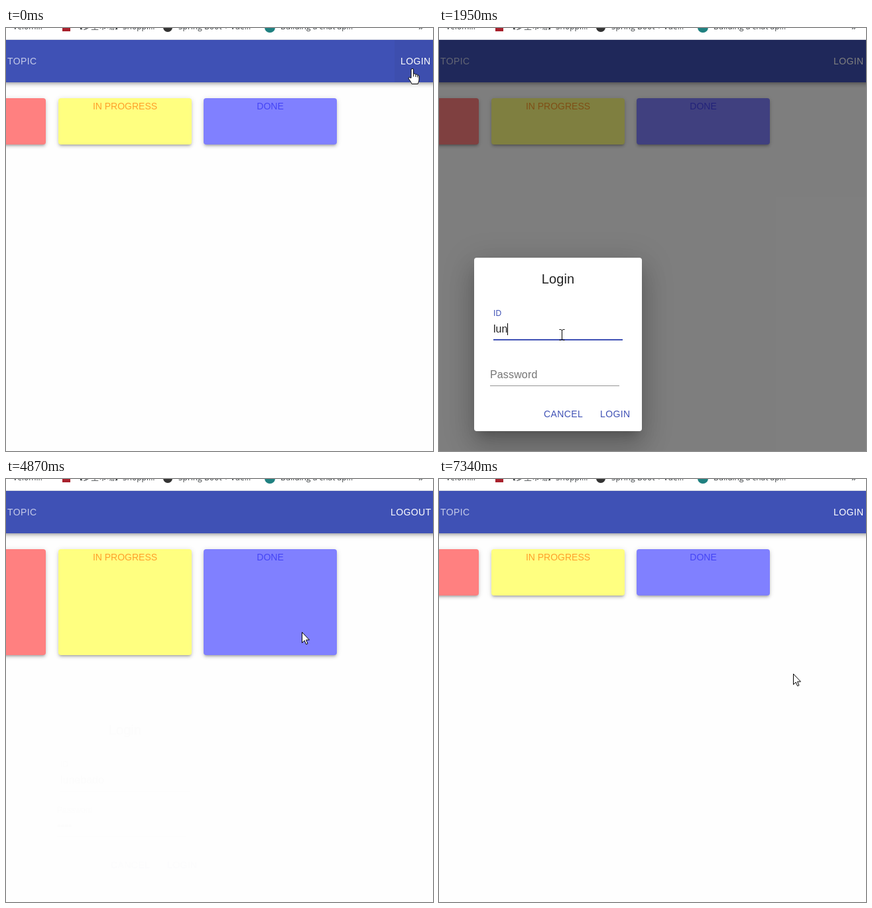
An HTML page that plays this animation: 644x639 px, repeating every 8.04 s.

```html
<!DOCTYPE html>
<html lang="ko">
<head>
<meta charset="utf-8">
<title>Task board</title>
<style>
html, body { margin: 0; width: 100%; height: 100%; overflow: hidden; background: #fefefe; }
body { position: relative; font: 14px/20px "Liberation Sans", Arial, "Noto Sans CJK KR", "Noto Sans CJK", sans-serif; color: rgba(0,0,0,.87); }
div, svg { position: absolute; white-space: pre; }
#bar { left: 0; top: 0; width: 100%; height: 17px; background: #fff; border-bottom: 1px solid #dcdee2; overflow: hidden;
  font: 12px/20px "Open Sans", "Noto Sans CJK JP", "Noto Sans CJK", sans-serif; color: #3c4043; }
#bar div { top: -12px; }
#page { left: 0; top: 18px; right: 0; bottom: 0; overflow: hidden; }
#world { left: 0; top: -18px; width: 100%; height: 639px; }
#board { left: 0; top: 0; }
#head { left: -20px; right: -20px; top: 18px; height: 64px; background: #3f51b5;
  box-shadow: 0 2px 4px -1px rgba(0,0,0,.2), 0 4px 5px rgba(0,0,0,.14), 0 1px 10px rgba(0,0,0,.12); }
.btn { letter-spacing: .4px; }
#hover, #flash { top: 18px; right: 0; height: 64px; }
#hover { background: rgba(0,0,0,.04); }
#flash { left: 586px; background: #fff; border-radius: 4px 0 0 4px; }
#ripple { left: 598px; top: 28px; width: 44px; height: 44px; border-radius: 50%; background: #fff; }
.col { top: 106px; width: 201px; border-radius: 4px; overflow: hidden;
  box-shadow: 0 3px 3px -2px rgba(0,0,0,.2), 0 3px 4px rgba(0,0,0,.14), 0 1px 8px rgba(0,0,0,.12); }
.name { left: 0; top: 2px; width: 100%; text-align: center; }
.card { left: 3px; width: 194px; background: #fff; border-radius: 4px; letter-spacing: .15px;
  box-shadow: 0 2px 1px -1px rgba(0,0,0,.2), 0 1px 1px rgba(0,0,0,.14), 0 1px 3px rgba(0,0,0,.12); }
.mid { left: 0; width: 166px; text-align: center; }
.date { font-size: 10px; letter-spacing: 0; color: #444; }
.dot { width: 7px; height: 7px; border-radius: 50%; left: 176px; }
#shade { left: 0; top: 18px; right: 0; bottom: 0; background: rgba(0,0,0,.5); }
#modal { left: 53px; top: 347px; width: 253px; height: 262px; background: #fff; border-radius: 4px;
  box-shadow: 0 11px 15px -7px rgba(0,0,0,.2), 0 24px 38px 3px rgba(0,0,0,.14), 0 9px 46px 8px rgba(0,0,0,.12); }
#modal .btn { top: 226px; color: #3f51b5; }
.field { width: 195px; height: 60px; font-size: 16px; }
.label { left: 0; top: 0; letter-spacing: .15px; transform-origin: 0 0; }
.value { left: 0; top: 0; height: 20px; display: flex; align-items: center; }
.value b { width: 1px; height: 18px; margin-right: -1px; background: #000; }
.line { left: 0; width: 100%; top: 26px; height: 1px; }
.focus { left: 0; width: 100%; top: 25px; height: 2px; background: #3f51b5; }
#alert { left: -60px; top: -40px; width: 464px; height: 144px; background: #fff; border-radius: 2px;
  box-shadow: 0 1px 3px rgba(0,0,0,.45), 0 2px 8px rgba(0,0,0,.25); }
#ok { left: 383px; top: 95px; width: 65px; height: 33px; border-radius: 4px; background: #3584ea; color: #fff;
  font-size: 13px; line-height: 32px; text-align: center; }
#mouse { left: 0; top: 0; width: 1px; height: 1px; overflow: visible; }
#mouse path { stroke-linejoin: round; }
</style>
</head>
<body>
<div id="page"><div id="world">
  <div id="head"></div>
  <div id="hover"></div><div id="flash"></div><div id="ripple"></div>
  <div class="btn" style="left:2px;top:40px;color:rgba(255,255,255,.7)">TOPIC</div>
  <div class="btn" id="sign" style="top:40px;color:#fff"></div>
  <div id="board"></div>
  <div id="shade"></div>
  <div id="modal">
    <div style="left:0;width:100%;top:22px;text-align:center;font-size:20px;letter-spacing:.15px">Login</div>
    <div class="btn" style="left:105px">CANCEL</div>
    <div class="btn" style="left:190px">LOGIN</div>
  </div>
</div></div>
<div id="bar"></div>
<div id="alert">
  <div style="right:296px;top:31px;font-size:15px">localhost:3000 내용:</div>
  <div style="right:367px;top:60px;font-size:13px;color:#444">Logged out</div>
  <div id="ok">확인</div>
</div>
<svg id="mouse">
  <path id="arrow" d="M.5 .5V16.5L4.2 13 6.7 18.7 9 17.7 6.6 12.1H11.5Z" fill="#fff" stroke="#000"/>
  <g id="hand" fill="#fff" stroke="#000">
    <path d="M-2 13.5V1.2a1.8 1.8 0 0 1 3.6 0V7.6c1-.9 3-.6 3.3.8 1-.7 2.6-.2 2.9 1 1.2-.4 2.2.3 2.2 1.6V16c0 3-1.5 4-1.8 6.5H-1c-.6-2.5-3-5-4.6-7.8-.9-1.6 1-2.7 2.2-1.6z"/>
    <path d="M1.6 7.6V11.5M4.9 8.4V12M7.8 9.4V12.5" fill="none"/>
  </g>
  <path id="beam" d="M-3.5-7.5H-1.5L.5-6.5 2.5-7.5H4.5M.5-6.5V7.5M-3.5 8.5H-1.5L.5 7.5 2.5 8.5H4.5" fill="none" stroke="#000"/>
</svg>
<script>
const LOOP = 8040;
const $ = id => document.getElementById(id);

function add(parent, cls, css, text = '') {
  const el = document.createElement('div');
  el.className = cls;
  el.style.cssText = css;
  el.textContent = text;
  parent.append(el);
  return el;
}

const clamp = v => Math.min(1, Math.max(0, v));
const ramp = (t, a, b) => { const p = clamp((t - a) / (b - a)); return p * p * (3 - 2 * p); };
const pulse = (t, a, b, c, d) => ramp(t, a, b) - ramp(t, c, d);
const mix = (a, b, p) => a + (b - a) * p;

// Bookmarks
[[-4, 't - Velom...'], [104, '【夢星市場】Shoppi...'], [260, 'Spring Boot + Vue...'], [414, 'Building a chat ap...']]
  .forEach(([x, s]) => add($('bar'), '', `left:${x}px`, s));
add($('bar'), '', 'left:622px;top:-13px;font-size:15px', '»');
[[85, -7, 12, '#a8202c', 0], [237, -8, 14, '#333', 50], [390, -9, 16, '#1f8080', 50]].forEach(([x, y, d, c, r]) =>
  add($('bar'), '', `left:${x}px;top:${y}px;width:${d}px;height:${d}px;background:${c};border-radius:${r}%`));

// Board
const cols = [[-141, '#ff8080', '#e33', 'TODO'], [79, '#ffff80', '#ff9f2a', 'IN PROGRESS'], [298, '#8080ff', '#4545f5', 'DONE']]
  .map(([x, bg, ink, name]) => {
    const col = add($('board'), 'col', `left:${x}px;background:${bg}`);
    add(col, 'name', `color:${ink}`, name);
    return col;
  });
const cards = [];

function card(col, top, height, dotY, color) {
  const el = add(cols[col], 'card', `top:${top - 106}px;height:${height}px`);
  if (!col) el.style.left = '4px';
  add(el, 'dot', `top:${dotY - top - 3.5}px;background:${color}`);
  cards.push(el);
  return el;
}

// top, height, then [line centre, right edge on stage, text]
[[141, 50, [155, 18, 'React - todo'], [177, 22, 'center']],
 [198, 72, [234, 25, 'Vue - article 처']],
 [276, 50, [290, 8, 'Node - cache']],
 [332, 28, [346, 10, 'Java - start']],
 [367, 28, [381, 15, 'Docker - start']],
 [401, 50]].forEach(([top, h, ...lines]) => {
  const el = card(0, top, h, top + h / 2, '#f52a1c');
  lines.forEach(([y, right, s]) => add(el, '', `right:${57 - right}px;top:${y - top - 10}px`, s));
});
[[141, 'Native - 대기질api 체크', '2020-5-6 ~'], [196, 'D3 - study d3', '2020-5-5 ~']].forEach(([top, name, date]) => {
  const el = card(1, top, 48, top + 14.5, '#ffe135');
  add(el, 'mid', 'top:4px', name);
  add(el, 'mid date', 'top:26px', date);
});

// Form fields
function field(x, y, name) {
  const el = add($('modal'), 'field', `left:${x - 53}px;top:${y - 347}px`);
  const f = { line: add(el, 'line', ''), focus: add(el, 'focus', ''), label: add(el, 'label', '', name), value: add(el, 'value', '') };
  f.text = document.createElement('span');
  f.caret = document.createElement('b');
  f.value.append(f.text, f.caret);
  return f;
}
const idField = field(82, 445, 'ID');
const pwField = field(77, 514, 'Password');

const USER = 'lunebado';
const idKeys = [1700, 1850, 1950, 2020, 2100, 2170, 2320, 2400];
const pwKeys = [3100, 3250, 3250, 3330];

function showField(f, t, start, end, keys, text) {
  const up = ramp(t, start, start + 230);
  const lit = up - ramp(t, end, end + 200);
  const n = keys.filter(k => k <= t).length;
  const since = t - (n ? keys[n - 1] : start);
  f.label.style.transform = `translateY(${-21.5 * up}px) scale(${1 - .25 * up})`;
  f.label.style.color = `rgb(${mix(117, 63, lit)},${mix(117, 81, lit)},${mix(117, 181, lit)})`;
  f.focus.style.transform = `scaleX(${up})`;
  f.focus.style.opacity = 1 - ramp(t, end, end + 200);
  f.text.textContent = text.slice(0, n);
  f.caret.style.opacity = t >= start && t < end && since % 1060 < 530 ? 1 : 0;
}

// Pointer: time, hotspot x, y, shape
const path = [
  [0, 613, 62, 'hand'], [110, 613, 62, 'hand'], [200, 575, 90, 'arrow'], [460, 347, 228, 'arrow'],
  [760, 196, 440, 'arrow'], [840, 188, 459, 'beam'], [1070, 185, 463, 'beam'], [3909, 185, 463, 'beam'],
  [3910, 294, 629, 'arrow'], [4000, 288, 645, 'arrow'], [4250, 300, 645, 'arrow'], [4870, 446, 231, 'arrow'],
  [5260, 598, 84, 'arrow'], [5380, 611, 58, 'hand'], [6180, 611, 58, 'hand'], [6230, 590, 60, 'arrow'],
  [6480, 356, 70, 'arrow'], [6650, 356, 70, 'arrow'], [6730, 374, 110, 'arrow'], [7340, 534, 294, 'arrow'], [LOOP, 534, 294, 'arrow']
];

function showMouse(t) {
  const i = path.findIndex(k => k[0] > t);
  const a = path[i - 1], b = path[i];
  const p = (t - a[0]) / (b[0] - a[0]);
  $('mouse').style.transform = `translate(${Math.round(mix(a[1], b[1], p))}px,${Math.round(mix(a[2], b[2], p))}px)`;
  ['arrow', 'hand', 'beam'].forEach(k => $(k).style.display = k === a[3] ? '' : 'none');
}

function render(t) {
  const out = t >= 4680 && t < 6930;
  $('sign').textContent = out ? 'LOGOUT' : 'LOGIN';
  $('sign').style.left = out ? '580px' : '595px';
  $('hover').style.left = out ? '572px' : '586px';
  $('hover').style.opacity = t < 200 || (t > 5300 && t < 6280) ? 1 : 0;
  $('flash').style.opacity = .18 * pulse(t, 70, 250, 480, 800);
  $('ripple').style.opacity = .2 * pulse(t, 5920, 5990, 6790, 7050);
  $('ripple').style.transform = `scale(${mix(.4, 1, ramp(t, 5900, 6000)) + .5 * ramp(t, 6790, 7050)})`;

  const height = 70 + 374 * pulse(t, 4680, 5280, 6890, 7330);
  cols.forEach(c => c.style.height = height + 'px');
  const shown = pulse(t, 4960, 5400, 6850, 7060);
  cards.forEach(c => {
    c.style.opacity = shown;
    c.style.transform = `scale(${mix(.85, 1, shown)})`;
  });

  const modal = pulse(t, 120, 350, 4640, 4878);
  $('shade').style.opacity = $('modal').style.opacity = modal;
  showField(idField, t, 240, 2600, idKeys, USER);
  showField(pwField, t, 2600, 4640, pwKeys, '••••');
  idField.line.style.background = `rgba(0,0,0,${t > 840 && t < 4000 ? .82 : .42})`;
  pwField.line.style.background = 'rgba(0,0,0,.42)';

  $('alert').style.opacity = pulse(t, 6000, 6168, 6740, 6870);
  showMouse(t);
}

function tick() {
  render(performance.now() % LOOP);
  requestAnimationFrame(tick);
}
tick();
</script>
</body>
</html>
```
